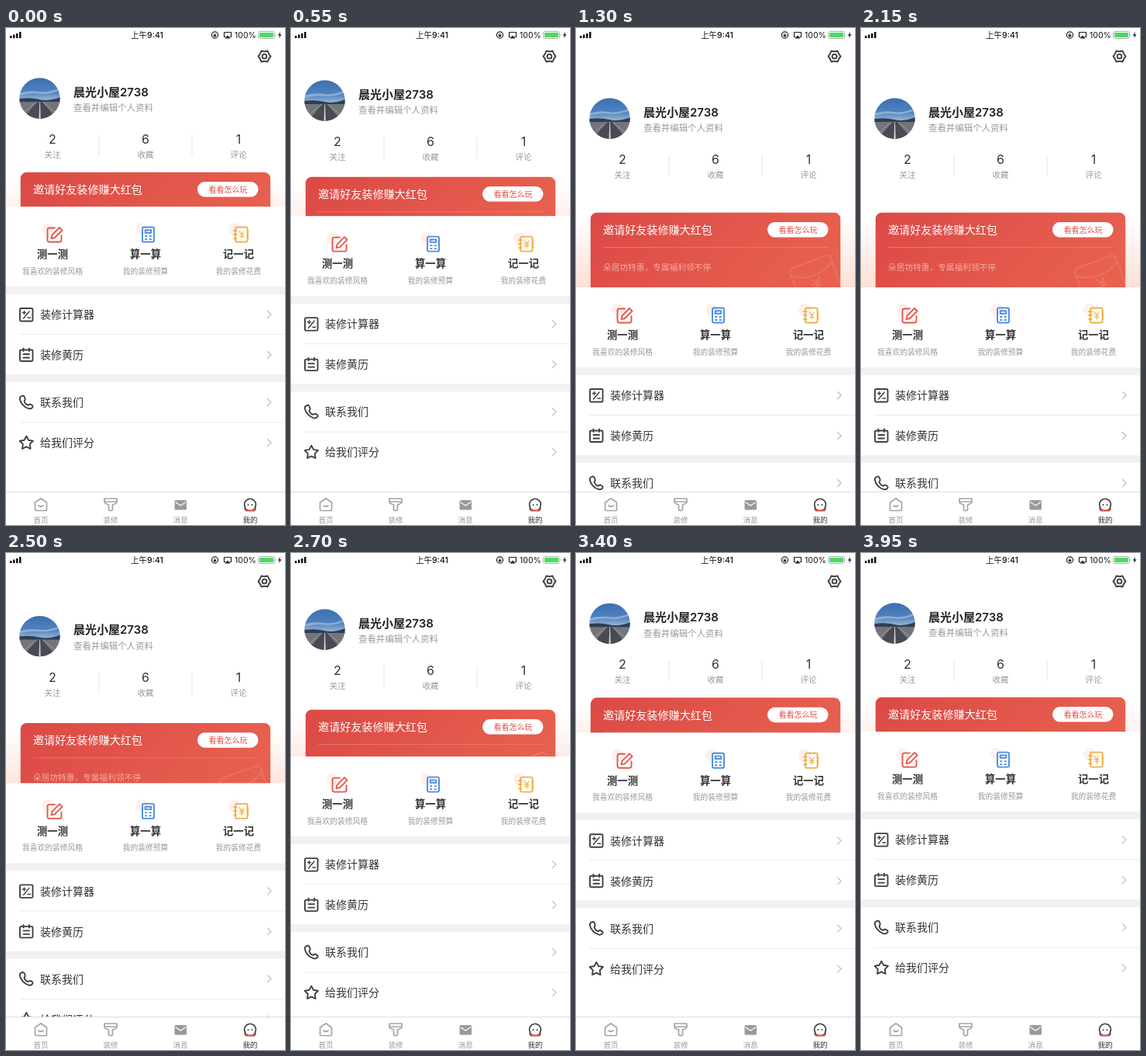
These frames come from a looping animation (360 by 640 pixels, 4 s). An HTML page:

```html
<!DOCTYPE html>
<html lang="zh-CN">
<head>
<meta charset="utf-8">
<title>我的</title>
<style>
html, body { margin: 0; width: 100%; height: 100%; overflow: hidden; background: #fff; }
svg { display: block; width: 360px; height: 640px; font-family: Inter, "Noto Sans CJK SC", "Noto Sans CJK", sans-serif; fill: #333; }
.mid { text-anchor: middle; }
.gray { fill: #999; }
.line { fill: none; stroke: #404040; stroke-width: 1.9; stroke-linecap: round; stroke-linejoin: round; }
.thin { stroke-width: 1.2; }
.rule { stroke: #ebebeb; }
.tab { stroke: #a4a4a4; stroke-width: 1.7; }
</style>
</head>
<body>
<svg viewBox="0 0 360 640">
  <defs>
    <linearGradient id="red" y2=".35"><stop stop-color="#dc4946"/><stop offset="1" stop-color="#e7614f"/></linearGradient>
    <linearGradient id="glow" x2="0" y2="1">
      <stop stop-color="#fcdcd2" stop-opacity="0"/><stop offset="1" stop-color="#fcdcd2"/>
    </linearGradient>
    <linearGradient id="sky" x2="0" y2="1">
      <stop stop-color="#3c6fae"/><stop offset=".6" stop-color="#4f82c0"/><stop offset="1" stop-color="#a9bfd6"/>
    </linearGradient>
    <clipPath id="round"><circle cx="43.5" cy="90.5" r="26.2"/></clipPath>
    <clipPath id="cardBox"><rect x="18.800" y="185.700" width="322.400" height="130" rx="8"/></clipPath>
  </defs>
  <rect width="360" height="640" fill="#fff"/>

  <g id="head">
    <g clip-path="url(#round)">
      <rect x="17" y="64" width="53" height="31" fill="url(#sky)"/>
      <path d="M17 84Q29 80 42 82T70 77V80Q56 86 43 84.500T17 87Z" fill="#b4c8de" opacity=".6"/>
      <rect x="17" y="93" width="53" height="25" fill="#73757a"/>
      <path d="M17 91Q32 89 43 92T70 89V95H17Z" fill="#2d3f55"/>
      <path d="M41 94H46L66 118H21Z" fill="#484b53"/>
      <path d="M43.3 95H44L44.700 118H42.500Z" fill="#dcdcdc"/>
      <path d="M40 95L18 113M47 95L69 113" stroke="#aaaaab" stroke-width=".8"/>
    </g>
    <text x="87" y="87.5" font-size="15" font-weight="600" fill="#222">晨光小屋2738</text>
    <text x="87" y="107.3" font-size="11.45" class="gray">查看并编辑个人资料</text>
    <g id="stats"></g>
    <path d="M120 138V165M240 138V165" stroke="#e4e4e4"/>
  </g>

  <g id="card">
    <rect y="192" width="360" height="100" fill="url(#glow)"/>
    <g clip-path="url(#cardBox)">
      <rect x="18" y="185" width="324" height="131" fill="url(#red)"/>
      <g class="line thin" style="stroke:#ec8272" opacity=".8" transform="translate(307 266) rotate(-20)">
        <path d="M-28 -12Q-28 -18 -22 -18H22Q28 -18 28 -12V40H-28Z"/>
        <path d="M-28 -8Q0 9 28 -8"/>
        <path d="M-5 5L0 11L5 5M0 11V19M-5 11H5M-5 15H5"/>
      </g>
    </g>
    <text x="35" y="213.2" font-size="14.1" font-weight="500" fill="#fff">邀请好友装修赚大红包</text>
    <rect x="247" y="198" width="78.500" height="19.500" rx="9.750" fill="#fff"/>
    <text x="286.500" y="211.600" font-size="10" font-weight="500" fill="#e0504a" class="mid">看看怎么玩</text>
    <path d="M35 230.500H325" stroke="#ea8070" stroke-width=".8"/>
    <text x="35" y="260" font-size="10.7" fill="#f3ada0">朵居坊特惠，专属福利领不停</text>
  </g>

  <g id="panel">
    <rect y="230" width="360" height="640" fill="#fff"/>
    <g fill="#fdf0ec"><circle cx="54" cy="259" r="8"/><circle cx="175" cy="259" r="8"/><circle cx="295" cy="259" r="8"/></g>
    <g class="line" style="stroke:#e6554c">
      <path d="M63 257.500H56Q53.500 257.500 53.500 260V273Q53.500 275.500 56 275.500H69Q71.500 275.500 71.500 273V267"/>
      <path d="M58.500 271L59.500 266.500L69 257L72.500 260.500L63 270Z"/>
    </g>
    <g class="line" style="stroke:#4b8de2">
      <rect x="176" y="256.500" width="15" height="19" rx="2"/>
      <path d="M179.700 260.300H187.300V263.700H179.700Z"/>
      <path d="M180 268H181.500M185.500 268H187M180 272H181.500M185.500 272H187"/>
    </g>
    <g class="line" style="stroke:#eeb247">
      <rect x="296" y="256.500" width="15.500" height="19" rx="2"/>
      <path d="M294 261H297.500M294 266H297.500M294 271H297.500M312 261V271"/>
      <path class="thin" d="M301.500 262L304.300 265.500L307 262M304.300 265.500V271M301.500 266H307M301.500 268.500H307"/>
    </g>
    <g id="tools"></g>
    <path d="M0 333H360V343H0ZM0 446H360V456H0Z" fill="#f1f1f1"/>
    <path class="rule" d="M17 394.500H360M17 508H360"/>
    <g id="rows"></g>
    <g class="line">
      <rect x="18" y="361" width="16.500" height="16.500" rx="1.500"/>
      <path style="stroke-width:1.500" d="M22.500 374L30 365M21.500 366.500H25.500M23.500 364.500V368.500M28 373H31.500"/>
      <path d="M20 414.500H33Q34.500 414.500 34.500 416V427.500Q34.500 429 33 429H19.500Q18 429 18 427.500V416Q18 414.500 20 414.500M22.500 412.500V416M30 412.500V416M22.500 420H30M22.500 424.500H30"/>
      <path d="M19.200 474.500L21.500 473.500Q23 473.300 23.500 474.600L24.700 477.500Q25 478.800 23.600 480.200C24 483 26 485 28.700 485.800Q30 484.200 31.500 484.500L34 486Q35 486.800 34.400 488.200Q32.800 490.800 29.500 490.200C23 488.500 18.500 482.500 17.800 477.500Q17.700 475.500 19.200 474.500Z"/>
      <path id="star"/>
    </g>
  </g>

  <g>
    <path d="M5 10H7.500V13H5ZM9 8.500H11.500V13H9ZM13 7H15.500V13H13ZM17 5H19.500V13H17Z" fill="#111"/>
    <text x="182" y="12.800" font-size="10.500" font-weight="500" fill="#111" class="mid">上午9:41</text>
    <g class="line thin" style="stroke:#222">
      <circle cx="269.500" cy="9" r="4.100"/>
      <path d="M283 11.500H281.500V5.500H290.500V11.500H289"/>
    </g>
    <path d="M286 9.500L289.500 13.500H282.500ZM267.700 8.700H271.300V11.300H267.700Z" fill="#222"/>
    <circle cx="269.500" cy="8.600" r="1.200" fill="none" stroke="#222" stroke-width=".7"/>
    <text x="309" y="12.800" font-size="10.500" fill="#111" class="mid">100%</text>
    <rect x="325.500" y="4.500" width="21" height="9" rx="2.300" fill="#fff" stroke="#999" stroke-width=".8"/>
    <rect x="327" y="6" width="18" height="6" rx="1" fill="#4cd964"/>
    <path d="M347.500 7.500Q349 9 347.500 10.500Z" fill="#999"/>
    <path d="M354 4.500L350.800 9.700H353L352 13.500L355.500 8.200H353.200Z" fill="#222"/>
    <g class="line">
      <path d="M329.500 29.500Q333.500 31 337.500 29.500Q338.800 33.500 341.500 36.500Q338.800 39.500 337.500 43.500Q333.500 42 329.500 43.500Q328.200 39.500 325.500 36.500Q328.200 33.500 329.500 29.500Z"/>
      <circle cx="333.500" cy="36.500" r="2.900"/>
    </g>
  </g>

  <g>
    <rect y="598" width="360" height="42" fill="#fff"/>
    <path d="M0 597.500H360" stroke="#dedede"/>
    <g class="line tab">
      <path d="M37.500 611L45 605.800L52.500 611V620Q52.500 621.500 51 621.500H39Q37.500 621.500 37.500 620ZM42 615Q45 617.500 48 615"/>
      <path d="M127 606H143V610.500Q143 612 141 612.500L137.500 614V620Q137.500 621.500 135 621.500T132.500 620V614L129 612.500Q127 612 127 610.500ZM127.500 610H142.500"/>
    </g>
    <rect x="217.500" y="608" width="15.500" height="12.500" rx="1.500" fill="#999"/>
    <path d="M218.500 610.500L225.200 615L232 610.500" fill="none" stroke="#fff" stroke-width="1.200"/>
    <path class="line" d="M311 620.300H309.500Q307.500 619.500 308.800 617.500A7.300 7.300 0 1 1 321.200 617.500Q322.500 619.500 320.500 620.300H319"/>
    <path d="M309.500 621.300H320.500" stroke="#e2504a" stroke-width="2.200" stroke-linecap="round"/>
    <circle cx="312.500" cy="614" r=".9"/><circle cx="317.500" cy="614" r=".9"/>
    <g id="tabs"></g>
  </g>
</svg>
<script>
const $ = id => document.getElementById(id);
const label = (x, y, size, str, attrs = 'class="mid"') =>
  `<text x="${x}" y="${y}" font-size="${size}" ${attrs}>${str}</text>`;
const fill = (id, items, draw) => { $(id).innerHTML = items.map(draw).join(''); };
const soft = 'class="mid gray"';

fill('stats', [['2', '关注'], ['6', '收藏'], ['1', '评论']], ([n, name], i) =>
  label(60 + 120 * i, 149, 16, n) + label(60 + 120 * i, 167, 10.5, name, soft));

fill('tools', [['测一测', '我喜欢的装修风格'], ['算一算', '我的装修预算'], ['记一记', '我的装修花费']], ([name, note], i) =>
  label(60 + 120 * i, 296.3, 13.3, name, 'class="mid" font-weight="600"') +
  label(60 + 120 * i, 316.8, 9.75, note, soft));

fill('rows', [['装修计算器', 369], ['装修黄历', 421], ['联系我们', 482], ['给我们评分', 534]], ([name, y]) =>
  label(44, y + 5.2, 14, name, '') +
  `<path class="line thin" style="stroke:#bbb" d="M337.500 ${y - 4.5}L342 ${y}L337.500 ${y + 4.5}"/>`);

fill('tabs', ['首页', '装修', '消息', '我的'], (name, i) =>
  label(45 + 90 * i, 636.5, 9.6, name, i < 3 ? soft : 'class="mid"'));

const points = Array.from({ length: 10 }, (_, i) => {
  const a = Math.PI * (i / 5 - 0.5), r = i % 2 ? 4.7 : 9;
  return `${26.3 + r * Math.cos(a)} ${534.5 + r * Math.sin(a)}`;
});
$('star').setAttribute('d', `M${points.join('L')}Z`);

// Drag down, hold, then a critically damped spring back.
function pull(ms) {
  if (ms < 2276) {
    const x = Math.min(1, Math.max(0, (ms - 200) / 1100)) ** 1.35;
    return 104 * x * x * (3 - 2 * x);
  }
  const s = (ms - 2276) * 0.00566;
  return 104 * (1 + s) * Math.exp(-s);
}

const shift = (id, y) => $(id).setAttribute('transform', `translate(0 ${y})`);
const start = performance.now();
function draw() {
  const ms = Math.max(0, performance.now() - start) % 4000;
  const y = pull(Math.floor(ms / 50) * 50);
  shift('head', y / 4);
  shift('card', y / 2);
  shift('panel', y);
  requestAnimationFrame(draw);
}
draw();
</script>
</body>
</html>
```
